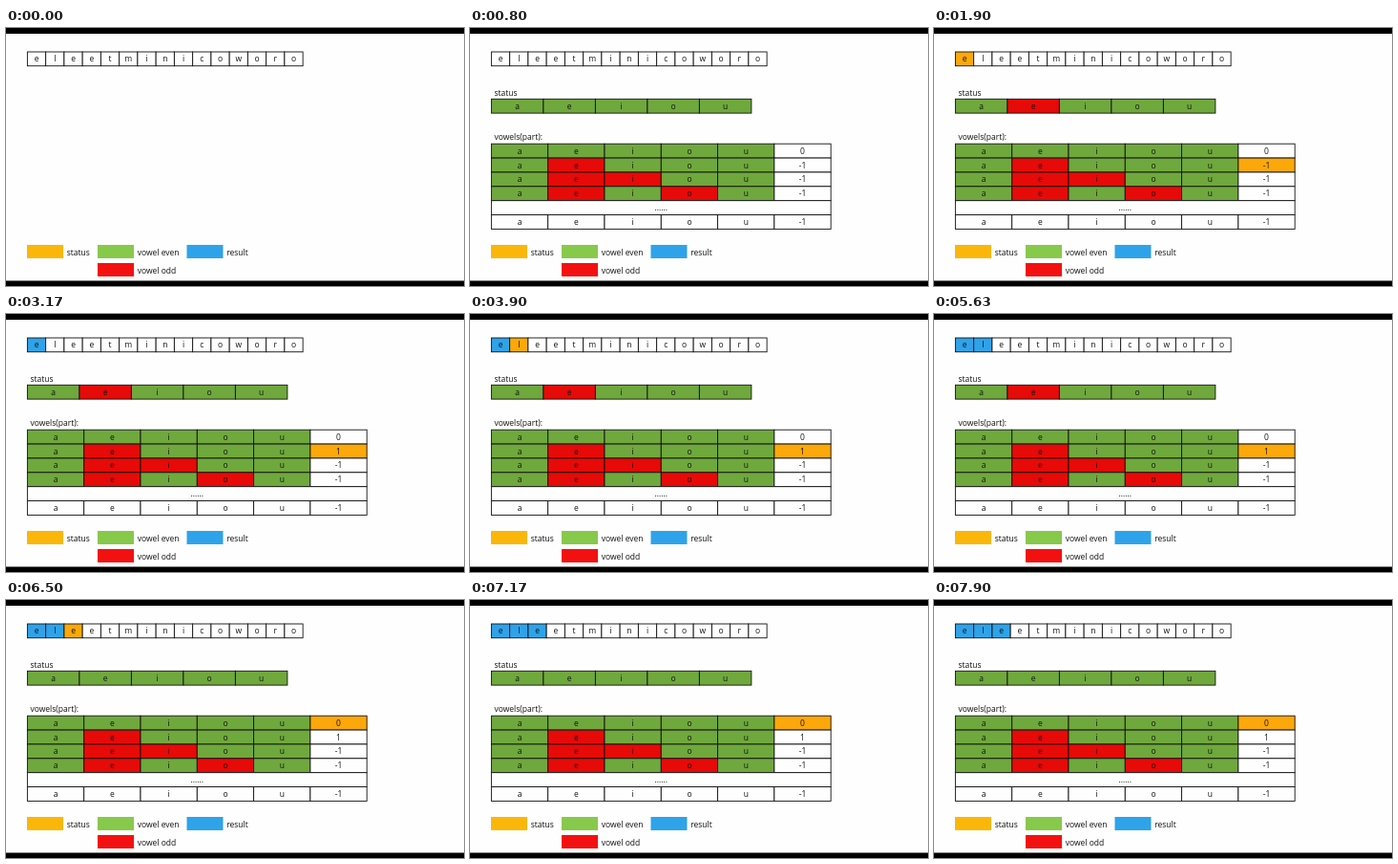
Recreate the animation shown at these times as an HTML page. Size 480x270 px, loop 8000 ms.

```html
<!DOCTYPE html>
<html lang="en">
<head>
<meta charset="utf-8">
<title>Vowel parity walk</title>
<style>
  html, body { margin: 0; width: 100%; height: 100%; overflow: hidden; background: #fff; }
  svg { display: block; width: 100vw; height: 100vh; }
  text { font: 8.5px "Open Sans", "Noto Sans", sans-serif; fill: #111; }
  .mid { text-anchor: middle; }
  .cell { stroke: #111; stroke-width: .9; }
</style>
</head>
<body>
<svg id="stage" viewBox="0 0 480 270"></svg>
<script>
const NS = "http://www.w3.org/2000/svg";
const stage = document.getElementById("stage");
const LOOP = 8000, STEP = 1000, LEAD = 230;
const WORD = "eleetminicoworo", VOWELS = "aeiou";
const C = { even: "#6fa83d", odd: "#e60a08", status: "#fca80a", result: "#2ea3ea", none: "#fefefe" };

// letters done, active letter, odd "e" in status, active row, value of the "e" row
const STATES = [
  null,
  { done: 0, at: -1, odd: false, row: -1, value: "-1" },
  { done: 0, at: 0, odd: true, row: 1, value: "-1" },
  { done: 1, at: -1, odd: true, row: 1, value: "1" },
  { done: 1, at: 1, odd: true, row: 1, value: "1" },
  { done: 2, at: -1, odd: true, row: 1, value: "1" },
  { done: 2, at: 2, odd: false, row: 0, value: "1" },
  { done: 3, at: -1, odd: false, row: 0, value: "1" }
];

function add(tag, attrs, parent = stage) {
  const node = document.createElementNS(NS, tag);
  for (const key in attrs) node.setAttribute(key, attrs[key]);
  return parent.appendChild(node);
}

function rect(x, y, width, height, fill, parent) {
  return add("rect", { x, y, width, height, fill }, parent);
}

function label(x, y, str, parent, cls = "") {
  const node = add("text", { x, y, class: cls }, parent);
  node.textContent = str;
  return node;
}

function cell(x, y, w, h, str, fill, parent) {
  const box = rect(x, y, w, h, fill, parent);
  box.setAttribute("class", "cell");
  return { box, text: label(x + w / 2, y + h / 2 + 3, str, parent, "mid") };
}

function cells(str, x, y, w, h, fill, parent) {
  return [...str].map((ch, i) => cell(x + i * w, y, w, h, ch, fill(i), parent));
}

rect(0, 0, 480, 270, C.none);
rect(0, 0, 480, 6, "#000");
rect(0, 264.5, 480, 5.5, "#000");

const letters = cells(WORD, 22.4, 25, 19.25, 14.7, () => C.none, stage);

[[22, 227, "#fbb60a", "status"], [96, 227, "#87c94a", "vowel even"],
 [189.5, 227, C.result, "result"], [96, 246, "#f31010", "vowel odd"]]
  .forEach(([x, y, fill, str]) => {
    rect(x, y, 38, 14, fill);
    label(x + 41.7, y + 10.8, str);
  });

const panel = add("g", {});
label(25.5, 70.5, "status", panel);
const parity = cells(VOWELS, 22.4, 74.3, 54.5, 14.8, () => C.even, panel);

label(25.5, 117, "vowels(part):", panel);
const X = 22.4, Y = 121.2, W = 59.3, H = 14.87;
const rows = [[], [1], [1, 2], [1, 3]].map((odd, r) => {
  const y = Y + r * H;
  cells(VOWELS, X, y, W, H, i => odd.includes(i) ? C.odd : C.even, panel);
  return cell(X + 5 * W, y, W, H, r ? "-1" : "0", C.none, panel);
});
cell(X, Y + 4 * H, 6 * W, H, "......", C.none, panel);
cells(VOWELS, X, Y + 5 * H, W, H, () => C.none, panel);
cell(X + 5 * W, Y + 5 * H, W, H, "-1", C.none, panel);

function paint(item, fill) {
  item.box.setAttribute("fill", fill);
}

function show(state) {
  panel.setAttribute("visibility", state ? "visible" : "hidden");
  const s = state || STATES[1];
  letters.forEach((item, i) =>
    paint(item, i < s.done ? C.result : i === s.at ? C.status : C.none));
  paint(parity[1], s.odd ? C.odd : C.even);
  rows.forEach((item, i) => paint(item, i === s.row ? C.status : C.none));
  rows[1].text.textContent = s.value;
}

let start, current = -1;
function tick(now) {
  start ??= now;
  const t = (now - start) % LOOP;
  const next = Math.min(STATES.length - 1, Math.floor((t + LEAD) / STEP));
  if (next !== current) show(STATES[current = next]);
  requestAnimationFrame(tick);
}
show(STATES[0]);
requestAnimationFrame(tick);
</script>
</body>
</html>
```
